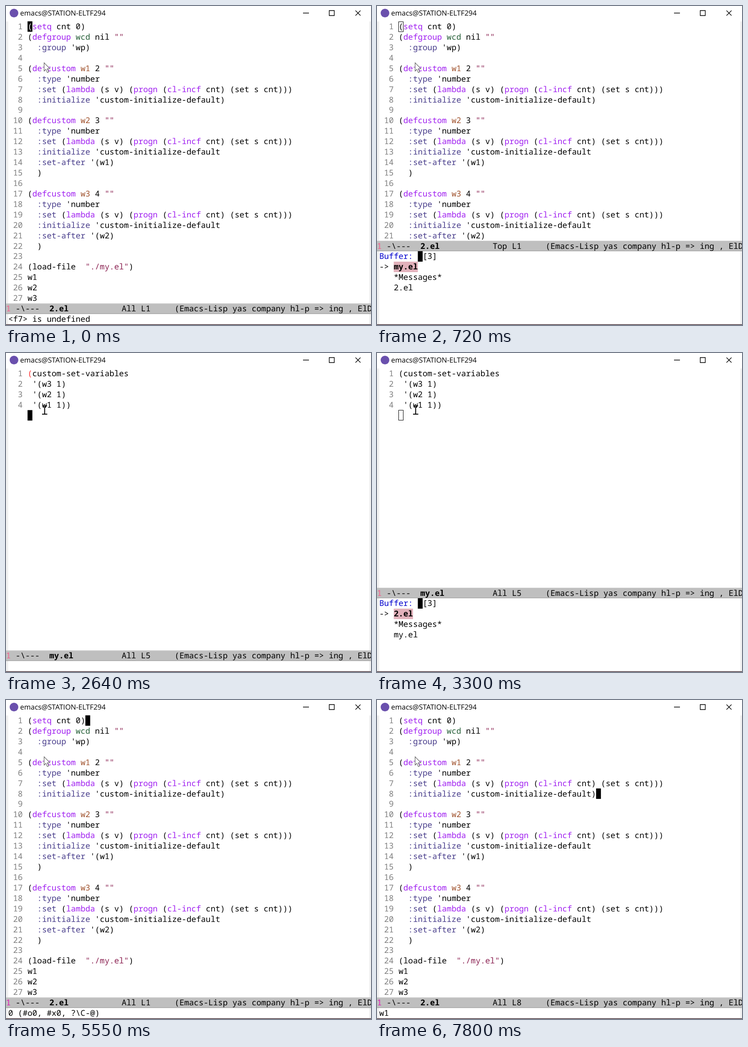
An HTML page that plays this animation: 800x700 px, repeating every 8000 ms.

```html
<!DOCTYPE html>
<html lang="en">
<head>
<meta charset="utf-8">
<title>Editor session</title>
<style>
  html, body { margin: 0; width: 100%; height: 100%; overflow: hidden; background: #fff; }
  svg { display: block; width: 800px; height: 700px; }
  text {
    font: 17.6px "Noto Sans Mono", "DejaVu Sans Mono", monospace;
    white-space: pre;
    text-rendering: geometricPrecision;
  }
  .title { font: 15.6px "Open Sans", "Noto Sans", sans-serif; }
  .bold { font-weight: 700; }
</style>
</head>
<body>
<svg id="stage" viewBox="0 0 800 700">
  <rect width="800" height="700" fill="#fff"/>
  <rect y="34" width="5" height="664" fill="#f1f1f1"/>
  <rect x="796" y="34" width="4" height="664" fill="#f1f1f1"/>
  <circle cx="17.5" cy="15.5" r="9.5" fill="#6a50ad"/>
  <text class="title" x="31" y="21">emacs@STATION-ELTF294</text>
  <path d="M651 15.5h13M708.5 10h11v11h-11zM766 10l11 11M777 10l-11 11" fill="none" stroke="#000" stroke-width="1.4"/>
  <g id="view"></g>
  <rect y="698" width="800" height="1" fill="#8d8688"/>
  <rect y="699" width="800" height="1" fill="#5e4650"/>
</svg>
<script>
const LOOP = 8000, LEFT = 5, CHAR = 10.56, ROW = 22.93, TOP = 33.6, BASE = 17.4, GUTTER = 4;

const field = (name, value, after) => [
  `(defcustom ${name} ${value} ""`,
  "  :type 'number",
  "  :set (lambda (s v) (progn (cl-incf cnt) (set s cnt)))",
  "  :initialize 'custom-initialize-default" + (after ? "" : ")"),
  ...(after ? [`  :set-after '(${after})`, "  )"] : []),
  "",
];

const files = {
  "2.el": [
    "(setq cnt 0)", '(defgroup wcd nil ""', "  :group 'wp)", "",
    ...field("w1", 2), ...field("w2", 3, "w1"), ...field("w3", 4, "w2"),
    '(load-file  "./my.el")', "w1", "w2", "w3",
  ],
  "my.el": ["(custom-set-variables", " '(w3 1)", " '(w2 1)", " '(w1 1))"],
};

const colors = { str: "#8b2252", key: "#483d8b", kw: "#a020f0", name: "#a0522d", type: "#28613a", txt: "#000" };
const syntax = /(?<str>"[^"]*")|(?<key>:[a-z-]+)|(?<=\()(?<kw>setq|defgroup|defcustom|lambda|progn|cl-incf)|(?<=defcustom )(?<name>w\d)|(?<=defgroup )(?<type>wcd)|(?<txt>\(|[^\s:"(]+)/g;

// start, file, line, column, echo text or buffer list, enclosing paren lit
const steps = [
  [0, "2.el", 1, 0, "<f7> is undefined"],
  [460, "2.el", 1, 0, ""],
  [720, "2.el", 1, 0, ["my.el", "*Messages*", "2.el"]],
  [1310, "my.el", 1, 0, ""],
  [1840, "my.el", 2, 0, ""],
  [1970, "my.el", 3, 0, "", true],
  [2240, "my.el", 4, 0, "", true],
  [2640, "my.el", 5, 0, "", true],
  [2770, "my.el", 5, 0, ""],
  [3300, "my.el", 5, 0, ["2.el", "*Messages*", "my.el"]],
  [3830, "2.el", 1, 0, ""],
  [4690, "2.el", 1, 12, ""],
  [5550, "2.el", 1, 12, "0 (#o0, #x0, ?\\C-@)"],
  [6150, "2.el", 3, 13, ""],
  [6740, "2.el", 3, 13, "wcd"],
  [7270, "2.el", 8, 41, ""],
  [7800, "2.el", 8, 41, "w1"],
];

const view = document.getElementById("view");

function add(tag, attrs, content = "") {
  const node = document.createElementNS("http://www.w3.org/2000/svg", tag);
  for (const key in attrs) node.setAttribute(key, attrs[key]);
  node.textContent = content;
  view.append(node);
}

const rowTop = row => TOP + row * ROW;
const write = (content, col, row, fill = "#000", bold = false, left = LEFT) =>
  add("text", { x: left + col * CHAR, y: rowTop(row) + BASE, fill, class: bold ? "bold" : "" }, content);
const box = (col, row, chars, fill) =>
  add("rect", { x: LEFT + col * CHAR, y: rowTop(row), width: chars * CHAR, height: ROW, fill });

function drawCode(lines, lit) {
  lines.forEach((line, row) => {
    write(String(row + 1).padStart(3), 0, row, "#7f7f7f");
    for (const m of line.matchAll(syntax)) {
      const kind = Object.keys(colors).find(k => m.groups[k]);
      const outer = lit && row === 0 && m.index === 0;
      write(m[0], GUTTER + m.index, row, outer ? "#ff3030" : colors[kind]);
    }
  });
}

function drawCursor(lines, line, col, hollow) {
  const row = line - 1, at = GUTTER + col;
  if (hollow) {
    add("rect", {
      x: Math.round(LEFT + at * CHAR) + .5, y: Math.round(rowTop(row)) + .5,
      width: 10, height: 22, fill: "none", stroke: "#000",
    });
    return;
  }
  box(at, row, 1, "#000");
  const under = (lines[row] || "")[col];
  if (under) write(under, at, row, "#fff");
}

function drawModeLine(row, file, line, where, tint) {
  const y = rowTop(row);
  add("rect", { y, width: 800, height: ROW, fill: "#bfbfbf" });
  add("rect", { y, width: 800, height: 1, fill: "#cfcfcf" });
  add("rect", { y: y + ROW - 1, width: 800, height: 1, fill: "#999" });
  const put = (s, col, fill, bold) => write(s, col, row, fill, bold, 0);
  put("1", 0, tint);
  put("-\\---", 2);
  put(file, 9, "#000", true);
  put(where, 24);
  put("L" + line, 28);
  put("(Emacs-Lisp yas company hl-p => ing , ElD", 35);
}

function drawBuffers(names, row) {
  write("Buffer:", 0, row, "#0000cd");
  box(8, row, 1, "#000");
  write("[3]", 9, row);
  write("->", 0, row + 1);
  box(3, row + 1, names[0].length, "#e2b1bb");
  names.forEach((name, i) => write(name, 3, row + 1 + i, "#000", i === 0));
}

function drawPointer(beam) {
  if (beam) {
    add("path", { d: "M79.5 116h4M86 116h4M84.7 117v16.5M79 134.3h11.5", fill: "none", stroke: "#000", "stroke-width": 2 });
  } else {
    add("path", {
      d: "M83.5 124.5v18.2l4-3.8 3 7.2 3.2-1.4-3-7h5.6z",
      fill: "#fff", stroke: "#555", "stroke-width": 1.1,
    });
  }
}

function draw([start, file, line, col, bottom, lit]) {
  const picking = Array.isArray(bottom);
  const barRow = picking ? 21 : 27;
  const lines = files[file].slice(0, barRow);
  const where = picking && file === "2.el" ? "Top" : "All";
  view.replaceChildren();
  drawCode(lines, lit);
  drawCursor(lines, line, col, picking);
  drawModeLine(barRow, file, line, where, start < 3830 ? "#f5608f" : "#e01fb8");
  if (picking) drawBuffers(bottom, barRow + 1);
  else write(bottom, 0, barRow + 1);
  drawPointer(file === "my.el");
}

const began = performance.now();
let shown;

function tick() {
  const t = (performance.now() - began) % LOOP;
  const step = steps.findLast(s => s[0] <= t);
  if (step !== shown) draw(shown = step);
  requestAnimationFrame(tick);
}
tick();
</script>
</body>
</html>
```
